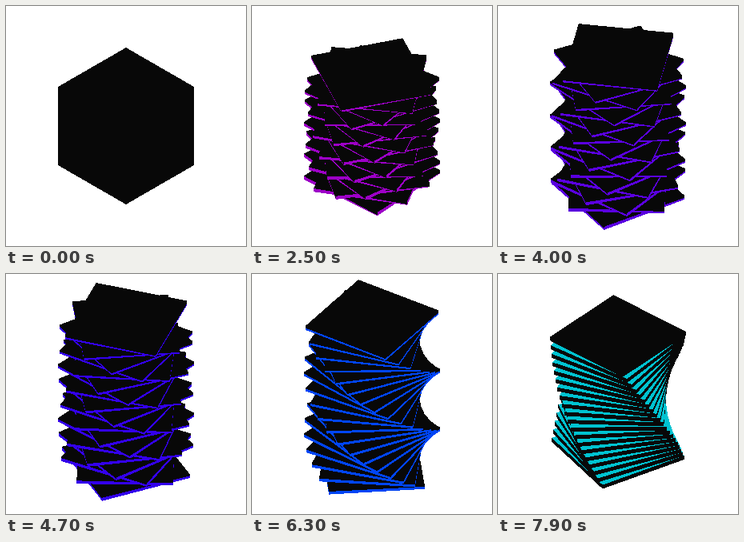
An HTML page that plays this animation: 300 px wide and 300 px high, repeating every 8 s.

```html
<!DOCTYPE html>
<html lang="en">
<head>
<meta charset="utf-8">
<title>Twisting cube</title>
<style>
  html, body { margin: 0; width: 100%; height: 100%; overflow: hidden; background: #fff; }
  svg { display: block; width: 100%; height: 100%; }
</style>
</head>
<body>
<svg viewBox="0 0 300 300" shape-rendering="crispEdges"></svg>
<script>
const LOOP = 8000, STEP = 100, HOLD = 500, CYCLE = 10000;
const SLABS = 20, RX = 85, RY = 49, THICK = 4.9, MAX_GAP = 4.75;
const INK = [8, 8, 8];
// time, hue, lightness of the glowing edges
const HUES = [[500, 315, 34], [1700, 300, 36], [3300, 275, 42], [4700, 253, 46],
              [5500, 241, 48], [6300, 223, 48], [7900, 184, 41]];

const svg = document.querySelector('svg');
const clamp = v => Math.min(1, Math.max(0, v));
const mix = (a, b, u) => a + (b - a) * u;

function addPath() {
  const path = document.createElementNS('http://www.w3.org/2000/svg', 'path');
  svg.append(path);
  return path;
}

// Back to front: the lowest slab comes first.
const slabs = Array.from({ length: SLABS }, (_, i) => ({
  k: SLABS - i, body: addPath(), strip: addPath(), top: addPath()
}));

// cubic-bezier(.25, .1, .25, 1)
function ease(x) {
  const curve = (s, a, b) => 3 * (1 - s) ** 2 * s * a + 3 * (1 - s) * s * s * b + s ** 3;
  let lo = 0, hi = 1;
  for (let i = 0; i < 24; i++) {
    const mid = (lo + hi) / 2;
    if (curve(mid, 0.25, 0.25) < x) lo = mid; else hi = mid;
  }
  return curve(lo, 0.1, 1);
}

function glowAt(t) {
  let i = 0;
  while (i < HUES.length - 2 && t > HUES[i + 1][0]) i++;
  const [a, b] = [HUES[i], HUES[i + 1]];
  const u = clamp((t - a[0]) / (b[0] - a[0]));
  const h = mix(a[1], b[1], u), l = mix(a[2], b[2], u) / 100;
  const channel = n => {
    const m = (n + h / 30) % 12;
    return 255 * (l - Math.min(l, 1 - l) * Math.max(-1, Math.min(m - 3, 9 - m, 1)));
  };
  return [channel(0), channel(8), channel(4)];
}

const rgb = (a, b, u) => `rgb(${a.map((v, i) => Math.round(mix(v, b[i], u)))})`;
const poly = pts => 'M' + pts.map(([x, y]) => x.toFixed(2) + ' ' + y.toFixed(2)).join('L') + 'Z';
const drop = ([x, y], d) => [x, y + d];

function draw(t) {
  const p = t < HOLD ? 0 : (t - HOLD + 10) / CYCLE;
  const turn = ease(p);
  const gap = MAX_GAP * Math.sin(Math.PI * p) ** 2;
  const glow = glowAt(t);
  const ledge = clamp((0.1 - (1 - turn)) / 0.05);
  const grow = clamp((p - 0.02) / 0.09) * (1 - ledge);
  const taper = clamp((p - 0.12) / 0.35) * 0.8;

  for (const { k, body, strip, top } of slabs) {
    const cy = 101 + (k - 1) * THICK + gap * (k - 11.3);
    const angle = -k * (1 - turn) * Math.PI / 2;
    const height = grow * (mix(1.8, 2.8, p) + 3 * (1 - p) * k / SLABS);
    const corners = [0, 1, 2, 3].map(j => {
      const a = angle + j * Math.PI / 2;
      return [150 + RX * Math.sin(a), cy - RY * Math.cos(a)];
    });
    let sides = '', lines = '';
    corners.forEach((right, j) => {
      const left = corners[(j + 1) % 4];
      if (left[0] >= right[0]) return;
      const lo = [drop(right, THICK), drop(left, THICK)];
      sides += poly([left, right, ...lo]);
      lines += poly([drop(lo[1], -height), drop(lo[0], -height * taper), ...lo]);
    });
    body.setAttribute('d', sides);
    body.setAttribute('fill', rgb(INK, INK, 0));
    strip.setAttribute('d', grow > 0 ? lines : '');
    strip.setAttribute('fill', rgb(INK, glow, 1));
    top.setAttribute('d', poly(corners));
    top.setAttribute('fill', rgb(INK, glow, k > 1 ? ledge : 0));
  }
}

const start = performance.now();
function tick() {
  const t = (performance.now() - start) % LOOP;
  draw(Math.floor(t / STEP) * STEP);
  requestAnimationFrame(tick);
}
tick();
</script>
</body>
</html>
```
